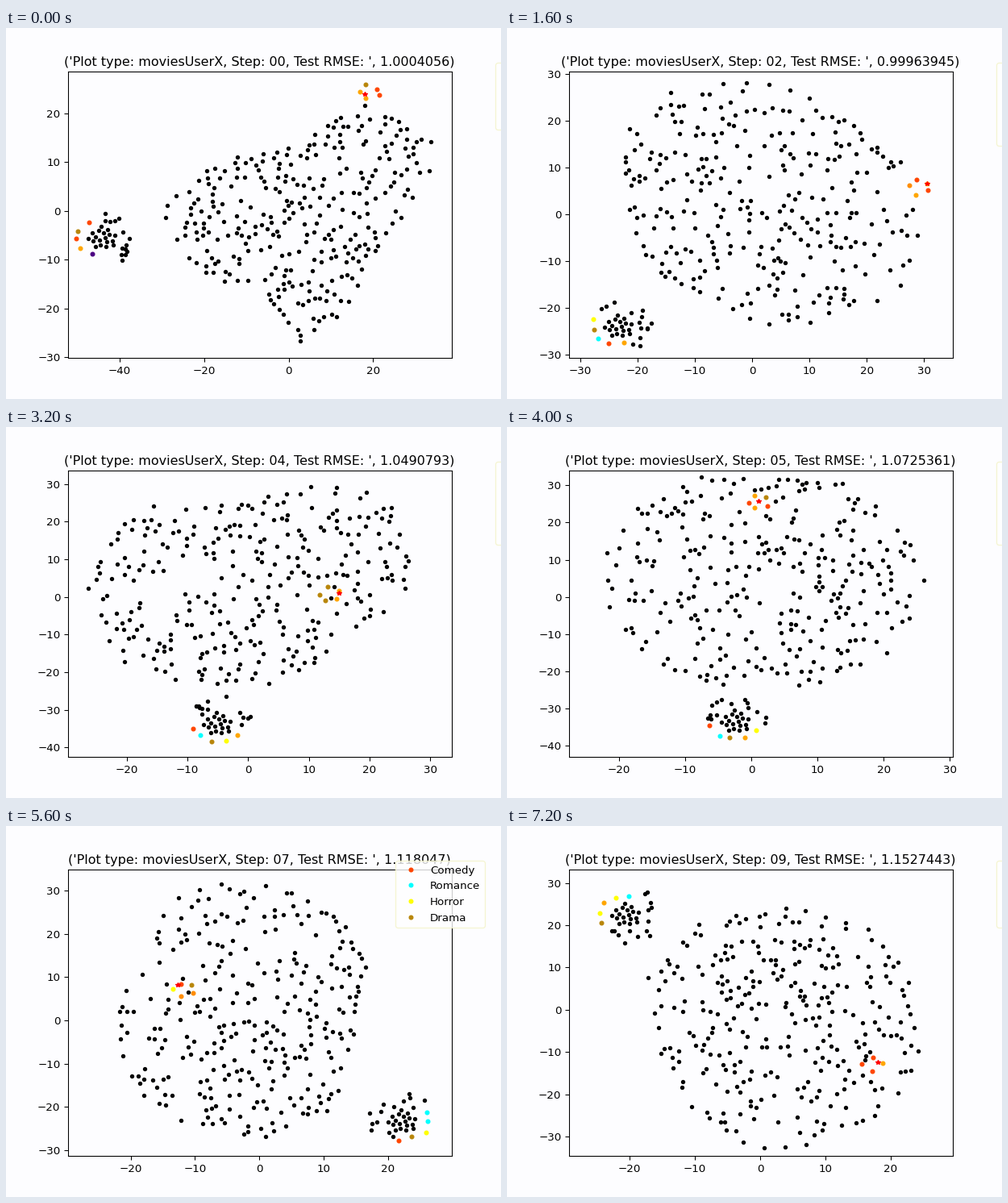
Write a matplotlib script that moves like this. It is 614 by 460 pixels and loops after 8000 ms.

```python
import numpy as np
import matplotlib.pyplot as plt
from matplotlib.animation import FuncAnimation
from matplotlib.transforms import Affine2D

W, H, DPI = 614, 460, 96
PAPER = "#fdfdff"
TOTAL = 322       # black dots per step
EDGE = 36         # of these, dots along the rim of the blob
GAP = 5.5         # smallest distance between scattered dots

COLORS = {"r": "#ff4500", "o": "#ffa500", "g": "#b8860b", "y": "#ffff00",
          "c": "#00ffff", "i": "#4b0082", "b": "#8b4513", "d": "#ff8c00"}
GENRES = {"Romance": "c", "Comedy": "r", "Documentary": "o", "Horror": "y",
          "Drama": "g"}

plt.rcParams["font.family"] = "DejaVu Sans"
fig, ax = plt.subplots(figsize=(W / DPI, H / DPI), dpi=DPI, facecolor=PAPER)
fig.subplots_adjust(top=0.882)
stage = Affine2D().scale(1 / W, -1 / H).translate(0, 1) + fig.transFigure
steps = []


def polar(center, rx, ry, angle):
    """Points on an ellipse; angles run clockwise from the right."""
    return np.column_stack([center[0] + rx * np.cos(angle),
                            center[1] + ry * np.sin(angle)])


def blob_radius(radii, angle):
    """Rim distance, interpolated between equally spaced directions."""
    knots = np.linspace(0, 2 * np.pi, len(radii), endpoint=False)
    return np.interp(angle, knots, radii, period=2 * np.pi)


def clump_dots(center, out, rng, n=18, strays=14):
    """Tight sunflower clump with strays on the side facing the blob."""
    k = np.arange(n)
    r = np.sqrt((k + 0.5) / n)
    core = polar(center, 18 * r, 15 * r, k * 2.39996)
    r = rng.uniform(1.3, 2.4, strays)
    angle = out + np.pi + rng.uniform(-1.7, 1.7, strays)
    return np.vstack([core, polar(center, 18 * r, 15 * r, angle)])


def blob_dots(center, radii, taken, rng):
    """Dots along the rim, then random ones inside it until TOTAL."""
    angle = np.linspace(0, 2 * np.pi, EDGE, endpoint=False)
    rim = blob_radius(radii, angle) * rng.uniform(0.92, 1.04, EDGE)
    dots = np.vstack([taken, polar(center, rim, rim, angle)])
    for offset in rng.uniform(-max(radii), max(radii), (5000, 2)):
        if len(dots) >= TOTAL:
            break
        if np.hypot(*offset) > blob_radius(radii, np.arctan2(*offset[::-1])):
            continue
        p = center + offset
        if np.hypot(*(dots - p).T).min() > GAP:
            dots = np.vstack([dots, p])
    return dots


def add_step(rmse, xlim, ylim, center, radii, clump, rated, star, near,
             similar, genres, inside=False):
    """Rated films fan out beyond the clump, similar ones circle `near`."""
    rng = np.random.default_rng(20 + len(steps))
    out = np.arctan2(clump[1] - center[1], clump[0] - center[0])
    fan = out + np.linspace(-1.1, 1.1, len(rated))
    turn = np.pi + np.arange(len(similar)) * 2 * np.pi / len(similar)
    tagged = np.vstack([polar(clump, 33, 22, fan), polar(near, 13, 9, turn)])
    tagged += rng.uniform(-2, 2, tagged.shape)
    dots = blob_dots(np.array(center), radii, clump_dots(clump, out, rng), rng)
    clear = [np.hypot(*(tagged - p).T).min() > GAP for p in dots]
    steps.append(dict(rmse=rmse, xlim=xlim, ylim=ylim, dots=dots[clear],
                      tagged=list(zip(rated + similar, tagged)), star=star,
                      genres=genres.split(),
                      loc="upper right" if inside else "upper left"))


add_step(1.0004056, (-52.3, 38.6), (-30.15, 28.5), (365, 235),
         [120, 98, 125, 148, 92, 132, 178, 125, 93, 80, 158, 192],
         (120, 260), "iorgr", (445, 82), (451, 80), "ogrro",
         "Comedy Drama Documentary Romance")
add_step(0.9987213, (-38.5, 39.2), (-30.6, 30.9), (345, 230),
         [170, 145, 150, 165],
         (118, 280), "gcoyr", (510, 152), (508, 158), "orgoy",
         "Comedy Horror Documentary Romance Drama")
add_step(0.99963945, (-31.95, 34.97), (-30.76, 30.4), (325, 225),
         [188, 182, 145, 143, 130, 162, 170, 205, 172, 153, 137, 162],
         (139, 370), "orcgy", (521, 193), (512, 197), "dryro",
         "Drama Horror Romance Comedy Documentary")
add_step(1.0219772, (-32.75, 47.05), (-30.17, 31.64), (245, 235),
         [128, 146, 152, 157, 150, 105, 122, 140, 172, 164, 150, 138],
         (494, 269), "crryo", (126, 185), (133, 186), "gorro",
         "Romance Comedy Documentary Horror", inside=True)
add_step(1.0490793, (-29.7, 33.5), (-42.56, 33.5), (305, 200),
         [198, 122, 116, 118, 130, 178, 198, 178, 115, 105, 145, 195],
         (263, 368), "oygcr", (413, 206), (401, 208), "ggoog",
         "Comedy Romance Horror Drama Documentary")
add_step(1.0725361, (-27.6, 30.4), (-43.1, 33.9), (315, 190),
         [205, 115, 200, 115],
         (284, 365), "yogcr", (312, 92), (312, 92), "rogro",
         "Comedy Romance Drama Documentary Horror")
add_step(1.0939684, (-25.45, 27.67), (-43.7, 34.25), (310, 195),
         [208, 165, 118, 103, 130, 180, 200, 168, 122, 108, 130, 183],
         (286, 368), "cobcr", (278, 75), (250, 86), "rrr",
         "Comedy Romance Drama Documentary Horror")
add_step(1.118047, (-29.75, 29.9), (-31.4, 34.8), (295, 230),
         [138, 150, 158, 150, 150, 168, 155, 130, 165, 157, 160, 165],
         (492, 366), "ccygr", (213, 197), (220, 203), "yrgdd",
         "Comedy Romance Horror Drama", inside=True)
add_step(1.1364518, (-29.5, 29.7), (-33.2, 33.8), (325, 240),
         [180, 145, 175, 145],
         (142, 118), "gyroc", (450, 302), (450, 302), "rodrg",
         "Comedy Romance Horror Documentary")
add_step(1.1527443, (-29.3, 29.46), (-34.6, 33.1), (345, 250),
         [160, 172, 143, 143, 150, 158, 160, 182, 156, 148, 150, 163],
         (148, 110), "gyoyc", (460, 293), (452, 295), "rror",
         "Drama Horror Documentary Romance")


def draw(i):
    s = steps[i]
    ax.clear()
    ax.set_facecolor(PAPER)
    ax.plot(*s["dots"].T, ".", color="black", ms=6, transform=stage)
    for code, point in s["tagged"]:
        ax.plot(*point, ".", color=COLORS[code], ms=7, transform=stage)
    ax.plot(*s["star"], "*", color="red", ms=4.5, transform=stage)
    for name in s["genres"]:
        ax.plot([], [], ".", color=COLORS[GENRES[name]], ms=7, label=name)
    ax.set_xlim(s["xlim"])
    ax.set_ylim(s["ylim"])
    ax.set_title(f"('Plot type: moviesUserX, Step: {i:02d}, "
                 f"Test RMSE: ', {s['rmse']})", fontsize=12, pad=5.5)
    ax.legend(loc=s["loc"], bbox_to_anchor=(1.1, 1.05), handleheight=0.88,
              edgecolor="#f4f4c8")
    return []


anim = FuncAnimation(fig, draw, frames=len(steps), interval=800,
                     init_func=lambda: draw(0), repeat=True, repeat_delay=0)
plt.show()
```
